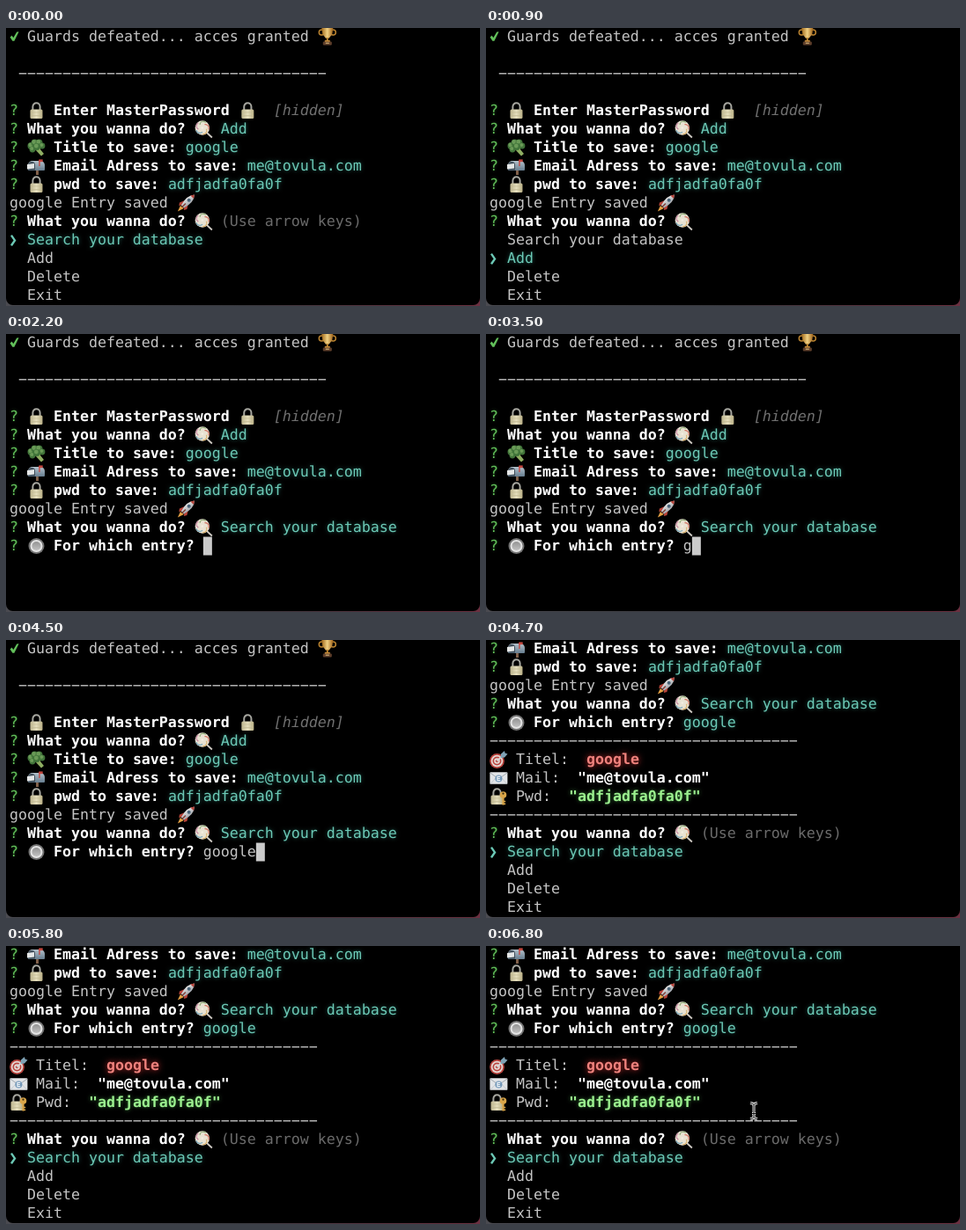
An HTML page with a canvas that plays this animation: 538 by 316 pixels, repeating every 6900 ms.

```html
<!DOCTYPE html>
<html lang="en">
<head>
<meta charset="utf-8">
<title>Terminal password manager</title>
<style>
  html, body { margin: 0; width: 100%; height: 100%; overflow: hidden; background: #000; }
  canvas { display: block; width: 538px; height: 316px; }
</style>
</head>
<body>
<canvas id="stage"></canvas>
<script>
const W = 538, H = 316, LOOP = 6900;
const ROWS = 15, ROW_H = 21, SIZE = 16.6, COL = SIZE * 0.602, LEFT = 4;
const FAMILY = '"DejaVu Sans Mono", "Liberation Mono", monospace';
const MAIL = 'me@tovula.com', PASS = 'adfjadfa0fa0f', ENTRY = 'google';
const RULE = '\u2212'.repeat(35);
const MENU = ['Search your database', 'Add', 'Delete', 'Exit'];

const canvas = document.getElementById('stage');
const ratio = window.devicePixelRatio || 1;
canvas.width = W * ratio;
canvas.height = H * ratio;
const ctx = canvas.getContext('2d');

// font prefix, colour, glow colour, glow radius
const STYLES = {
  text: ['', '#c4c4c4'],
  bold: ['bold ', '#ffffff'],
  dim: ['', '#6b6b6b'],
  hidden: ['italic ', '#707070'],
  cyan: ['', '#6cc9b6', '#1d5a50', 4],
  green: ['', '#62bf5a', '#1d4a1b', 3],
  red: ['bold ', '#ee827d', '#c22a2c', 7],
  lime: ['bold ', '#9cf08f', '#2f7030', 4]
};

/* Shape helpers, used inside a 20 x 20 icon box */
function poly(color, ...p) {
  ctx.fillStyle = color;
  ctx.beginPath();
  for (let i = 0; i < p.length; i += 2) ctx.lineTo(p[i], p[i + 1]);
  ctx.closePath();
  ctx.fill();
}
function line(color, width, ...p) {
  ctx.strokeStyle = color;
  ctx.lineWidth = width;
  ctx.beginPath();
  for (let i = 0; i < p.length; i += 2) ctx.lineTo(p[i], p[i + 1]);
  ctx.stroke();
}
function disc(color, x, y, rx, ry = rx) {
  ctx.fillStyle = color;
  ctx.beginPath();
  ctx.ellipse(x, y, rx, ry, 0, 0, 7);
  ctx.fill();
}
function ring(color, width, x, y, r, from = 0, to = Math.PI * 2) {
  ctx.strokeStyle = color;
  ctx.lineWidth = width;
  ctx.beginPath();
  ctx.arc(x, y, r, from, to);
  ctx.stroke();
}
function box(color, x, y, w, h, r = 0) {
  ctx.fillStyle = color;
  ctx.beginPath();
  ctx.roundRect(x, y, w, h, r);
  ctx.fill();
}
function fade(x0, y0, x1, y1, ...colors) {
  const g = ctx.createLinearGradient(x0, y0, x1, y1);
  colors.forEach((c, i) => g.addColorStop(i / (colors.length - 1), c));
  return g;
}

const ICONS = {
  check() {
    poly('#62bf5a', 0.6, 10.4, 2.6, 8.6, 4.4, 11, 8.2, 4.4, 10.6, 4.2, 5.4, 14.8, 3.4, 14.8);
  },
  pointer() {
    line('#6cc9b6', 2.4, 2, 4.6, 6, 10.4, 2, 16.2);
  },
  trophy() {
    ring('#b9822f', 1.5, 4.5, 5, 3);
    ring('#b9822f', 1.5, 17.5, 5, 3);
    poly(fade(5, 0, 17, 0, '#a56f22', '#f0d183', '#a56a20'), 4.5, 0, 17.5, 0, 16.5, 7, 13, 11.5, 9, 11.5, 5.5, 7);
    box('#bd832c', 10, 11, 2, 4);
    box('#c98f3c', 8, 14, 6, 2);
    box('#5f3f2b', 6, 15.5, 10, 4, 1);
    box('#b99a66', 9, 16.5, 4, 1.5);
  },
  lock() {
    ctx.strokeStyle = '#a6a69f';
    ctx.lineWidth = 2;
    ctx.beginPath();
    ctx.moveTo(6.4, 10);
    ctx.lineTo(6.4, 5.4);
    ctx.arc(10.5, 5.4, 4.1, Math.PI, 0);
    ctx.lineTo(14.6, 10);
    ctx.stroke();
    box(fade(3, 0, 18, 0, '#b9b18a', '#e6dfbe', '#b3a97f'), 3.5, 8.5, 14, 10.5, 1.5);
    line('#c3ba92', 0.7, 4, 12, 17, 12);
    line('#c3ba92', 0.7, 4, 15.5, 17, 15.5);
  },
  keyLock() {
    ctx.save();
    ctx.translate(-2, 0);
    ICONS.lock();
    ctx.restore();
    disc('#d9a548', 15.5, 8, 3.8);
    disc('#33290f', 15.5, 6.6, 1.1);
    line('#d9a548', 2.2, 15.5, 11, 15.5, 19.5);
    line('#d9a548', 1.5, 15.5, 15.5, 18.2, 15.5);
    line('#d9a548', 1.5, 15.5, 18.3, 18.2, 18.3);
  },
  lolly() {
    line('#cfcbc4', 1.8, 13, 13, 20, 19.5);
    disc('#e9e2d2', 9, 8.5, 8.2);
    const hues = ['#d0705f', '#d9b06a', '#79a8bb', '#c98aa5', '#8fae78'];
    hues.forEach((c, i) => {
      const a = i * Math.PI * 0.4;
      ring(c, 1.2, 9 + 3.5 * Math.cos(a), 8.5 + 3.5 * Math.sin(a), 3.9, a - 1.8, a + 0.5);
    });
    disc('#f3ede0', 9, 8.5, 1.3);
  },
  broccoli() {
    poly('#8fae62', 9, 8, 15, 8, 15, 12, 19, 17, 16, 19.5, 10, 13);
    for (const [x, y, r] of [[4.5, 8, 4], [8.5, 4.5, 4], [13.5, 4.5, 4], [17, 8, 3.4], [6, 12, 3.4], [11, 9, 4]]) {
      disc('#41743a', x, y, r);
      disc('#6a9a57', x - 0.7, y - 1, r * 0.6);
    }
  },
  mailbox() {
    box('#80604a', 10, 13, 3, 7);
    box(fade(0, 4, 0, 15, '#b3c1cb', '#667d8f'), 1, 4, 19, 11, [5, 5, 1, 1]);
    box('#3f4d59', 1.5, 5, 7.5, 9.5, [3.5, 3.5, 0, 0]);
    poly('#e6e8e8', 0, 8, 8, 7, 8, 12.5, 0, 13.5);
    line('#c4473f', 1.4, 14, 10, 14, 3);
    box('#c4473f', 13.3, 2.4, 4.4, 2.8);
  },
  rocket() {
    poly('#e3a044', 4, 13, 8, 16, 1, 19.5);
    poly('#b8443a', 9, 7, 3, 9.5, 2.5, 13, 7, 12);
    poly('#b8443a', 13, 11, 11.5, 17, 8, 18, 8.5, 13);
    ctx.fillStyle = fade(8, 4, 14, 12, '#f0f0ee', '#a4a8ae');
    ctx.beginPath();
    ctx.moveTo(20, 0.5);
    ctx.quadraticCurveTo(20, 9, 8, 15.5);
    ctx.lineTo(5, 12.5);
    ctx.quadraticCurveTo(11, 1, 20, 0.5);
    ctx.fill();
    poly('#b8443a', 20, 0.5, 19.2, 5, 15.5, 1.6);
    disc('#4a6478', 13.8, 6.8, 2);
    line('#83413a', 1.5, 6, 14.5, 10, 10.5);
  },
  radio() {
    disc('#757575', 10.5, 10, 9);
    disc('#e4e4e4', 10.5, 10, 7);
    disc(fade(0, 4, 0, 16, '#8f8f8f', '#c6c6c6'), 10.5, 10, 5);
  },
  target() {
    ['#b9453f', '#e6ddd8', '#b9453f', '#e6ddd8', '#b9453f'].forEach((c, i) => disc(c, 8.5, 11.5, 8.4 - i * 1.7));
    line('#d9d9d9', 1.8, 8.5, 11.5, 16, 4.5);
    poly('#7fa3b6', 12.5, 8, 13, 3.5, 17, 0, 17.6, 2.6, 20.5, 3.4, 17, 7.5);
  },
  letter() {
    box('#e2e5e8', 0.4, 3.2, 20, 13.6, 1);
    line('#9ba3aa', 0.9, 0.8, 4, 10.4, 11, 20, 4);
    line('#b9c0c6', 0.7, 1, 16.5, 7.5, 9.5);
    line('#b9c0c6', 0.7, 19.8, 16.5, 13.2, 9.5);
    disc('#7297b8', 10.4, 10.5, 4);
    line('#eef3f7', 1.1, 12.3, 8.4, 8.9, 8.4, 8.9, 12.6, 12.3, 12.6);
    line('#eef3f7', 1.1, 8.9, 10.5, 11.9, 10.5);
  }
};

/* A screen line is a list of [style, text] or [icon, columns] parts. */
const blank = n => ['text', ' '.repeat(n)];
const ask = (...parts) => [['green', '? '], ...parts];
const field = (icon, label, value) => ask([icon, 2], ['bold', ` ${label} `], ['cyan', value]);
const action = (...parts) => ask(['bold', 'What you wanna do? '], ['lolly', 2], blank(1), ...parts);
const result = (icon, label, style, value) => [[icon, 2], ['text', ` ${label}:  `], [style, value]];

const HISTORY = [
  [['check', 2], ['text', 'Guards defeated... acces granted '], ['trophy', 2]],
  [],
  [['text', ' ' + RULE]],
  [],
  ask(['lock', 2], ['bold', ' Enter MasterPassword '], ['lock', 2], blank(2), ['hidden', '[hidden]']),
  action(['cyan', 'Add']),
  field('broccoli', 'Title to save:', ENTRY),
  field('mailbox', 'Email Adress to save:', MAIL),
  field('lock', 'pwd to save:', PASS),
  [['text', ENTRY + ' Entry saved '], ['rocket', 2]]
];
const RESULT = [
  [['text', RULE]],
  result('target', 'Titel', 'red', ENTRY),
  result('letter', 'Mail', 'bold', `"${MAIL}"`),
  result('keyLock', 'Pwd', 'lime', `"${PASS}"`),
  [['text', RULE]]
];

const menu = (selected, hint) => [
  action(...(hint ? [['dim', '(Use arrow keys)']] : [])),
  ...MENU.map((item, i) => i === selected
    ? [['pointer', 2], ['cyan', item]]
    : [['text', '  ' + item]])
];

/* Timing */
const CHOICES = [[0, 0], [100, 1], [300, 2], [500, 3], [700, 2], [900, 1], [1100, 0]];
const CHOSEN = 1600, SENT = 4600, POINTER = 6600;
const KEYS = [3500, 3700, 3800, 3900, 4100, 4300];

function screenAt(t) {
  if (t < CHOSEN) {
    const [, selected] = CHOICES.filter(([at]) => at <= t).pop();
    return [...HISTORY, ...menu(selected, t < CHOICES[1][0])];
  }
  const done = t >= SENT;
  const typed = ENTRY.slice(0, KEYS.filter(at => at <= t).length);
  const lines = [
    ...HISTORY,
    action(['cyan', MENU[0]]),
    ask(['radio', 2], ['bold', ' For which entry? '], [done ? 'cyan' : 'text', typed], ...(done ? [] : [['caret', 1]]))
  ];
  return done ? [...lines, ...RESULT, ...menu(0, true)] : lines;
}

/* Drawing */
function drawPart(kind, value, x, top) {
  if (kind === 'caret') {
    box('#cbcbcb', x, top, 10, ROW_H);
    return 1;
  }
  ctx.save();
  if (ICONS[kind]) {
    ctx.translate(x, top + 0.5);
    ICONS[kind]();
    ctx.restore();
    return value;
  }
  const [weight, color, glow, blur] = STYLES[kind];
  ctx.font = `${weight}${SIZE}px ${FAMILY}`;
  ctx.fillStyle = color;
  if (glow) {
    ctx.shadowColor = glow;
    ctx.shadowBlur = blur * ratio;
  }
  ctx.fillText(value, x, top + 15.5);
  ctx.restore();
  return value.length;
}

function drawWindow() {
  ctx.fillStyle = fade(0, 0, W, 0, '#4a4a50', '#3a3a40', '#6b3040');
  ctx.fillRect(0, 0, W, H);
  box('#000', 0, -20, W, H + 19, 8);
}

function drawBeam(x, y) {
  const shape = (color, width) => {
    line(color, width, x, y - 7, x, y + 7);
    line(color, width, x - 4, y - 9, x - 1.5, y - 8.5, x, y - 7, x + 1.5, y - 8.5, x + 4, y - 9);
    line(color, width, x - 4, y + 9, x - 1.5, y + 8.5, x, y + 7, x + 1.5, y + 8.5, x + 4, y + 9);
    line(color, width, x - 2, y + 3, x + 2, y + 3);
  };
  shape('#e4e4e4', 3);
  shape('#111', 1);
}

function draw(t) {
  ctx.setTransform(ratio, 0, 0, ratio, 0, 0);
  ctx.textRendering = 'geometricPrecision';
  drawWindow();
  screenAt(t).slice(-ROWS).forEach((parts, row) => {
    let col = 0;
    for (const [kind, value] of parts) {
      col += drawPart(kind, value, LEFT + col * COL, row * ROW_H - 0.5);
    }
  });
  if (t >= POINTER) {
    const left = 2 - Math.min(2, Math.floor((t - POINTER) / 100));
    drawBeam(304 + 10 * left, 187.5 + 10 * left);
  }
}

const start = performance.now();
function tick() {
  draw((performance.now() - start) % LOOP);
  requestAnimationFrame(tick);
}
tick();
</script>
</body>
</html>
```
